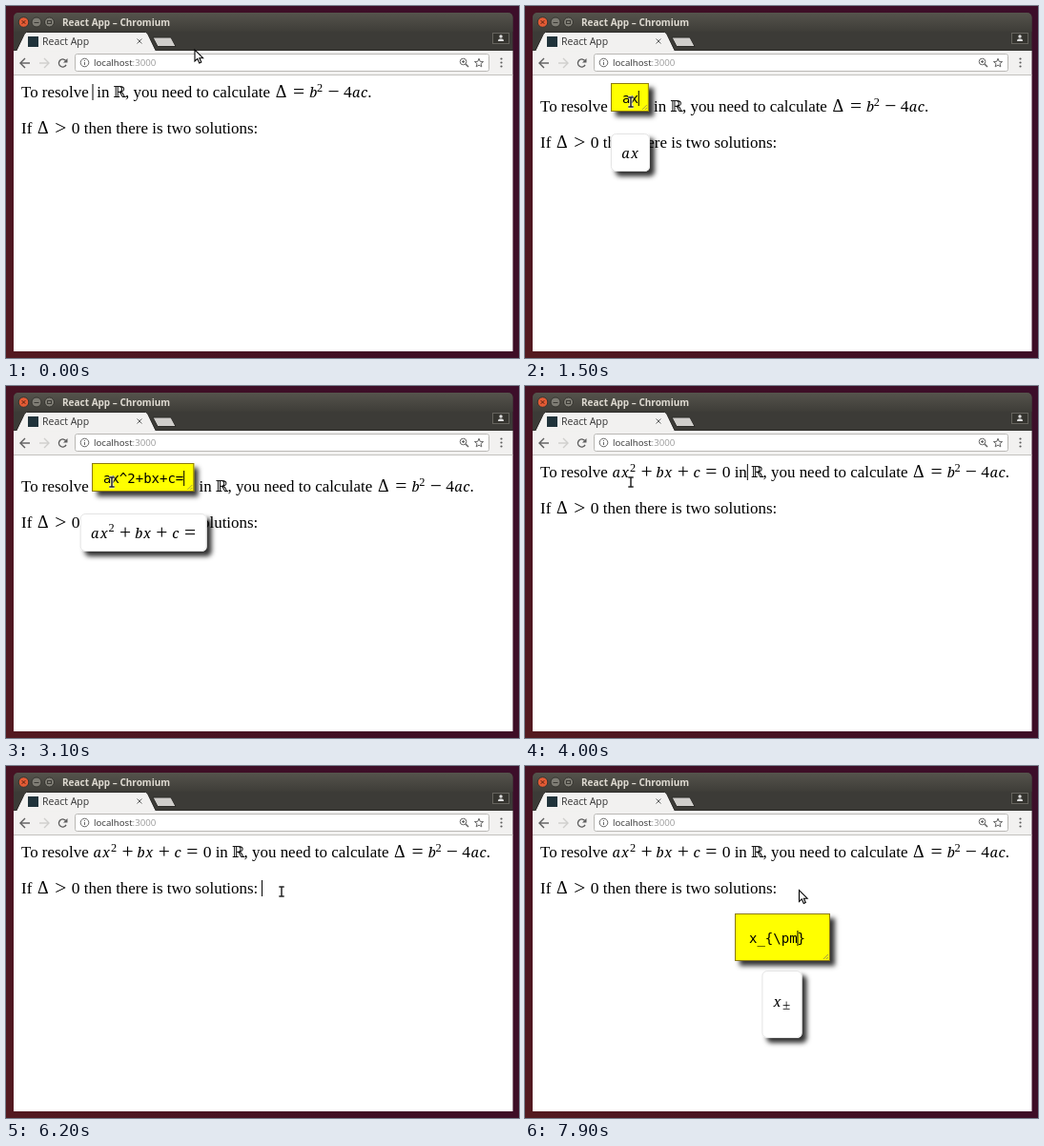
These frames come from a looping animation (538x370 px, 8000 ms). An HTML page with a canvas:

```html
<!DOCTYPE html>
<html lang="en">
<head>
<meta charset="utf-8">
<title>Equation editor</title>
<style>
html, body { margin: 0; width: 538px; height: 370px; overflow: hidden; background: #330b1e; }
canvas { display: block; }
</style>
</head>
<body>
<canvas id="stage" width="538" height="370"></canvas>
<script>
const g = document.getElementById('stage').getContext('2d');
const LOOP = 8000, STEP = 100, EM = 17.25;
const SERIF = '"Liberation Serif", serif';
const SANS = '"Open Sans", sans-serif';
const PROSE = '16.95px ' + SERIF;
const MONO = '14px "DejaVu Sans Mono", monospace';
const CHAR = 8.43;
const EQUATION = 'ax^2+bx+c=0';
const KEYS = ['', 'x', 'x_', 'x_{}', 'x_{\\}', 'x_{\\p}', 'x_{\\pm}'];
const WIDTH = { a: .529, b: .429, c: .433, x: .572, 'Δ': .833, 'ℝ': .722 };

const clamp = (v, lo, hi) => Math.max(lo, Math.min(hi, v));

function rect(x, y, w, h, fill, radius = 0) {
  g.beginPath();
  g.roundRect(x, y, w, h, radius);
  g.fillStyle = fill;
  g.fill();
}

function circle(x, y, r, fill, stroke) {
  g.beginPath();
  g.arc(x, y, r, 0, 7);
  if (fill) { g.fillStyle = fill; g.fill(); }
  if (stroke) { g.strokeStyle = stroke; g.stroke(); }
}

function path(points, fill, stroke, width = 1, closed = !!fill) {
  g.beginPath();
  points.forEach(([x, y]) => g.lineTo(x, y));
  if (closed) g.closePath();
  if (fill) { g.fillStyle = fill; g.fill(); }
  if (stroke) { g.strokeStyle = stroke; g.lineWidth = width; g.stroke(); }
  g.lineWidth = 1;
}

function text(s, x, y, font, fill = '#000') {
  g.font = font;
  g.fillStyle = fill;
  g.fillText(s, x, y);
  return x + g.measureText(s).width;
}

const prose = (s, x, y) => text(s, x, y, PROSE);

function glyph(ch, x, y, width, font) {
  g.textAlign = 'center';
  text(ch, x + width / 2, y, font);
  g.textAlign = 'left';
}

// Sets a formula with TeX-like spacing and returns its right end; without y it only measures.
function math(src, x, y) {
  for (let i = 0; i < src.length; i++) {
    let ch = src[i];
    if (ch === '^' || ch === '_') {
      const up = ch === '^';
      ch = src[++i];
      const w = (up ? .35 : .545) * EM;
      if (y) glyph(ch, x, y + (up ? -6.3 : 3), w, (up ? 12.3 : 15) + 'px ' + SERIF);
      x += w + .05 * EM;
      continue;
    }
    const relation = '=>'.includes(ch), binary = '+-'.includes(ch);
    const last = i === src.length - 1;
    const gap = relation ? .278 * EM : binary && !last ? .222 * EM : 0;
    const w = (WIDTH[ch] || (relation || binary ? .778 : .5)) * EM;
    x += gap;
    if (y) {
      if (relation || binary) glyph(ch === '-' ? '−' : ch, x, y + 1.2, w, '21.5px ' + SERIF);
      else if (ch === 'Δ') glyph(ch, x, y, w, '18px ' + SERIF);
      else if (ch === 'ℝ') glyph(ch, x, y, w, '16px "DejaVu Serif", "DejaVu Sans", serif');
      else if (/[a-z]/.test(ch)) glyph(ch, x, y, w, 'italic 14.5px "Noto Serif", serif');
      else glyph(ch, x, y, w, '17.5px ' + SERIF);
    }
    x += w + (last ? 0 : gap);
  }
  return x;
}

function card(x, y, w, h, fill, radius) {
  g.save();
  g.shadowColor = 'rgba(0,0,0,.8)';
  g.shadowBlur = 5;
  g.shadowOffsetX = g.shadowOffsetY = 5;
  rect(x, y, w, h, fill, radius);
  g.restore();
}

function caret(x, y, h = 17) {
  path([[x, y], [x, y + h]], null, '#000');
}

function input(x, y, w, h, value, pad, baseline, pos) {
  card(x, y, w, h, '#ff0');
  g.strokeStyle = '#8c7a10';
  g.strokeRect(x + .5, y + .5, w - 1, h - 1);
  for (const d of [3, 6]) path([[x + w - 1 - d, y + h - 2], [x + w - 2, y + h - 1 - d]], null, '#a8a040');
  text(value, x + pad, baseline, MONO);
  caret(x + pad + pos * CHAR + .4, baseline - 13, 16);
}

function preview(src, center, y, h, baseline) {
  const w = math(src, 0) + 22, x = center - w / 2;
  card(x, y, w, h, '#fff', 5);
  g.beginPath();
  g.roundRect(x + .5, y + .5, w - 1, h - 1, 5);
  g.strokeStyle = '#e4e4e4';
  g.stroke();
  math(src, x + 11, baseline);
}

function browser() {
  const wall = g.createLinearGradient(538, 0, 0, 370);
  wall.addColorStop(0, '#3c0e2a');
  wall.addColorStop(.5, '#3f0e24');
  wall.addColorStop(1, '#541a20');
  rect(0, 0, 538, 370, wall);

  const bar = g.createLinearGradient(0, 7, 0, 28);
  bar.addColorStop(0, '#55534c');
  bar.addColorStop(1, '#3d3c37');
  rect(8, 7, 523.5, 50, '#3c3b37', [5, 5, 0, 0]);
  rect(8, 7, 523.5, 20, bar, [5, 5, 0, 0]);
  circle(18.5, 17, 5.3, '#e35b35', '#35342f');
  circle(32, 17, 5, '#7f7d75', '#35342f');
  circle(45.5, 17, 5, '#7f7d75', '#35342f');
  path([[16.7, 15.2], [20.3, 18.8]], null, '#52200f');
  path([[20.3, 15.2], [16.7, 18.8]], null, '#52200f');
  path([[29.5, 17.5], [34.5, 17.5]], null, '#3a3934');
  g.strokeStyle = '#3a3934';
  g.strokeRect(43.5, 15.5, 4, 3);
  text('React App – Chromium', 59, 20.5, 'bold 10px ' + SANS, '#dfdbd2');

  // A dark hairline runs along the toolbar's top and around the tab.
  const edge = '#2d2c29';
  rect(8, 46, 523.5, 1, edge);
  rect(8, 47, 523.5, 26, '#f2f1f0');
  path([[11, 47.5], [19.5, 29], [21.5, 27.5], [146.5, 27.5], [148.5, 29], [157, 47.5]], '#f2f1f0');
  path([[11, 46.5], [19.5, 29], [21.5, 27.5], [146.5, 27.5], [148.5, 29], [157, 46.5]], null, edge);
  path([[154, 33], [173, 33], [178, 42.5], [159, 42.5]], '#d0cecb', edge);
  rect(23, 32, 11, 11, '#20333b');
  text('React App', 38, 41, '10.5px ' + SANS, '#333');
  path([[137.5, 34.5], [142.5, 39.5]], null, '#666');
  path([[142.5, 34.5], [137.5, 39.5]], null, '#666');
  rect(510, 28, 18, 12, '#35342f', 2);
  g.strokeStyle = '#66645e';
  g.strokeRect(510.5, 28.5, 17, 11);
  circle(519, 32, 1.7, '#ddd');
  rect(516, 34.5, 6, 2.5, '#ddd', [2, 2, 0, 0]);

  rect(8, 72, 523.5, 1, '#c4c2bf');
  for (const [x, d, color] of [[20, 1, '#5c5c5c'], [40, -1, '#cfcecc']]) {
    path([[x - 5 * d, 60], [x + 5 * d, 60]], null, color, 1.4);
    path([[x, 55], [x - 5 * d, 60], [x, 65]], null, color, 1.4);
  }
  g.beginPath();
  g.arc(59.5, 60, 4, .5, 5.5);
  g.strokeStyle = '#5c5c5c';
  g.lineWidth = 1.4;
  g.stroke();
  path([[64.5, 55], [64.5, 59.5], [60, 59.5]], '#5c5c5c');

  rect(72, 50, 435, 19, '#fff', 2);
  g.beginPath();
  g.roundRect(72.5, 50.5, 434, 18, 2);
  g.strokeStyle = '#b9b7b4';
  g.stroke();
  circle(82.5, 59.5, 4.3, null, '#666');
  rect(82, 57, 1, 1, '#666');
  rect(82, 59, 1, 3, '#666');
  const end = text('localhost', 92, 63, '9.7px ' + SANS, '#333');
  text(':3000', end, 63, '9.7px ' + SANS, '#999');
  circle(479.5, 58.5, 3.3, null, '#666');
  path([[482, 61], [485, 64]], null, '#666', 1.5);
  path([[478, 58.5], [481, 58.5]], null, '#666');
  path([[479.5, 57], [479.5, 60]], null, '#666');
  const star = Array.from({ length: 10 }, (_, i) => {
    const r = i % 2 ? 2.1 : 4.8, a = i * Math.PI / 5;
    return [496 + r * Math.sin(a), 60 - r * Math.cos(a)];
  });
  path(star, null, '#666', 1, true);
  for (const y of [55.5, 59.5, 63.5]) circle(519.5, y, 1.1, '#5c5c5c');

  rect(8, 73, 523.5, 290, '#fff');
}

function pointer(t) {
  const glide = (from, to, a, b) => {
    const u = clamp((t - a) / (b - a), 0, 1), e = u * u * (3 - 2 * u);
    return from.map((v, i) => v + (to[i] - v) * e);
  };
  const [x, y] = t < 4000
    ? glide([198, 46], [111, 101], 100, 800)
    : glide([111, 101], [289, 132], 4700, 5700);
  if (y < 73 || t >= 6500) {
    const [ax, ay] = y < 73 ? [x, y] : [287.5, 130.5];
    const shape = [[0, 0], [0, 12], [2.8, 9.4], [4.8, 14], [6.8, 13], [4.9, 8.7], [8.6, 8.7]];
    path(shape.map(([px, py]) => [ax + px, ay + py]), '#fff', '#000', 1.1);
    return;
  }
  for (const [color, w] of [['#fff', 3], ['#222', 1.5]]) {
    path([[x, y - 5], [x, y + 5]], null, color, w);
    for (const d of [-5, 5]) path([[x - 2.7, y + d], [x + 2.7, y + d]], null, color, w);
  }
}

function draw(t) {
  browser();
  const inline = t >= 800 && t < 3700, block = t >= 6500;
  const y = inline ? 111 : 96;
  const typed = EQUATION.slice(0, clamp(Math.floor((t - 1300) / 200) + 1, 0, EQUATION.length));
  const boxWidth = 23 + typed.length * CHAR;

  const start = prose('To resolve ', 16, y);
  let x = start;
  if (inline) x += boxWidth;
  else if (t >= 3700) x = math(EQUATION, x, y);
  const formulaEnd = x;
  x = prose(' in ', x, y);
  x = math('ℝ', x, y);
  x = prose(', you need to calculate ', x, y);
  x = math('Δ=b^2-4ac', x, y);
  prose('.', x, y);

  x = prose('If ', 16, y + 38);
  x = math('Δ>0', x, y + 38);
  const lineEnd = prose(' then there is two solutions: ', x, y + 38);

  if (inline) {
    input(90, 81, boxWidth, 30, typed, 12, 102, typed.length);
    preview(typed.replace(/\^$/, ''), 90.5 + boxWidth / 2, 134, 40, 159.5);
  } else if (block) {
    const k = clamp(Math.floor((t - 6900) / 200) + 1, 0, KEYS.length - 1);
    input(220, 155, 100, 50, KEYS[k], 15, 186, k);
    preview(k === 6 ? 'x_±' : k ? 'x' : '', 269.5, 215, 71, 252.5);
  } else if (t < 800) {
    if (t < 500) caret(start, 82);
  } else if (t < 5900) {
    // The caret steps right out of the formula, then blinks.
    g.font = PROSE;
    const passed = ' in'.slice(0, (t - 3700) / 100);
    if (t < 4000 || t % 1000 < 500) caret(formulaEnd + g.measureText(passed).width + .5, 82);
  } else if ((t - 5900) % 1000 < 500) {
    caret(lineEnd, 120);
  }
  pointer(t);
}

function tick(now) {
  draw(Math.floor(now % LOOP / STEP) * STEP);
  requestAnimationFrame(tick);
}
requestAnimationFrame(tick);
</script>
</body>
</html>
```
